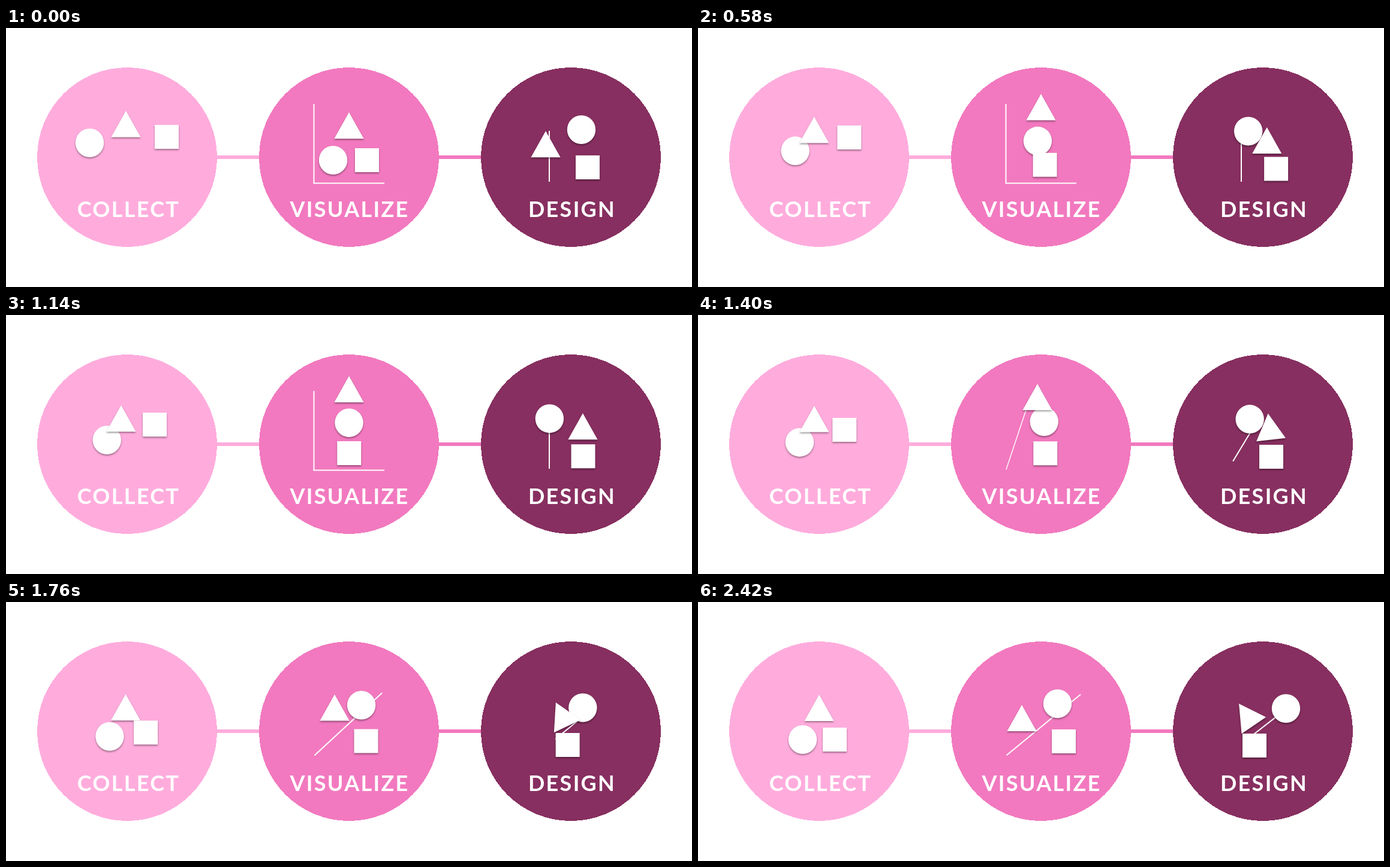
Write an HTML page without scripts that moves like this. It is 1144x433 px and loops after 3.22 s.

```html
<!DOCTYPE html>
<html lang="en">
<head>
<meta charset="utf-8">
<title>Collect, visualize, design</title>
<style>
  html, body { margin: 0; width: 100%; height: 100%; overflow: hidden; background: #fff; }
  svg { display: block; width: 1144px; height: 433px; }

  .disc { shape-rendering: crispEdges; }
  .line { fill: none; stroke: #fff; stroke-width: 2; }
  text {
    font: 700 36px Lato, "Open Sans", sans-serif;
    letter-spacing: 2.3px;
    text-anchor: middle;
    fill: #fff;
  }

  /* Each part eases from place --a to --b, then on to --c, and rests. */
  .part {
    fill: #fff;
    filter: drop-shadow(0 2px 1.8px rgba(0, 0, 0, .38));
    animation: move 3.22s ease infinite;
  }
  .turn { animation: turn 3.22s ease infinite; }
  .axis { animation: fade 3.22s linear infinite; }
  .trend { animation: tilt 3.22s ease infinite, thin 3.22s linear infinite; }
  .stem { animation: swing 3.22s ease infinite; }

  @keyframes move {
    0% { translate: var(--a); }
    37.267%, 37.888% { translate: var(--b); }
    75.155%, 100% { translate: var(--c); }
  }
  @keyframes turn {
    0%, 37.888% { rotate: 0deg; }
    75.155%, 100% { rotate: -34.3deg; }
  }
  @keyframes fade {
    0%, 37.888% { opacity: 1; }
    42.857%, 100% { opacity: 0; }
  }
  @keyframes tilt {
    0%, 37.888% { d: path("M513.5 259.5L513.5 127"); }
    63.975%, 100% { d: path("M514.5 256.3L638 154.5"); }
  }
  @keyframes thin {
    0%, 37.888% { stroke-width: 2; }
    43.478% { stroke-width: 1.4; }
    54.658%, 100% { stroke-width: 2; }
  }
  @keyframes swing {
    0%, 37.888% { d: path("M906 257L906 172"); animation-timing-function: ease-in; }
    43.478% { d: path("M892 244.5L926 188"); animation-timing-function: ease-out; }
    57.764%, 100% { d: path("M918 228L970 187.4"); }
  }
</style>
</head>
<body>
<svg viewBox="0 0 1144 433">
  <defs>
    <ellipse id="dot" rx="23.7" ry="24"/>
    <path id="tri" d="M0-22L24.6 22H-24.6Z"/>
    <path id="box" d="M-20-20H20V20H-20Z"/>
  </defs>

  <path d="M345 216H430" stroke="#ffacdd" stroke-width="6"/>
  <path d="M715 216H800" stroke="#f279bf" stroke-width="6"/>
  <circle class="disc" cx="202" cy="216" r="150" fill="#ffacdd"/>
  <circle class="disc" cx="572" cy="216" r="150" fill="#f279bf"/>
  <circle class="disc" cx="942" cy="216" r="150" fill="#872f60"/>

  <text x="204.5" y="315.5">COLLECT</text>
  <text x="573" y="315.5">VISUALIZE</text>
  <text x="944" y="315.5">DESIGN</text>

  <!-- collect -->
  <use href="#dot" class="part" style="--a:139.5px 192px; --b:168.3px 209px; --c:174.5px 230px"/>
  <use href="#tri" class="part" style="--a:200px 160.5px; --b:192px 173px; --c:202px 177px"/>
  <use href="#box" class="part" style="--a:268px 182px; --b:248px 183.3px; --c:228px 230px"/>

  <!-- visualize -->
  <path class="line axis" d="M512.5 259.5H631"/>
  <path class="line trend" d="M513.5 259.5L513.5 127"/>
  <use href="#dot" class="part" style="--a:545.5px 221px; --b:572.1px 180.1px; --c:599.5px 170px"/>
  <use href="#tri" class="part" style="--a:572px 163px; --b:572px 124px; --c:540px 194px"/>
  <use href="#box" class="part" style="--a:602px 221px; --b:572.2px 231px; --c:610px 233px"/>

  <!-- design -->
  <path class="line stem" d="M906 257L906 172"/>
  <use href="#dot" class="part" style="--a:959.5px 170px; --b:906.3px 173.2px; --c:980.5px 178px"/>
  <g class="part" style="--a:900px 194.2px; --b:962px 186.3px; --c:914.5px 188.2px">
    <use href="#tri" class="turn"/>
  </g>
  <use href="#box" class="part" style="--a:970px 233px; --b:962.5px 236.2px; --c:928px 240px"/>
</svg>
</body>
</html>
```
